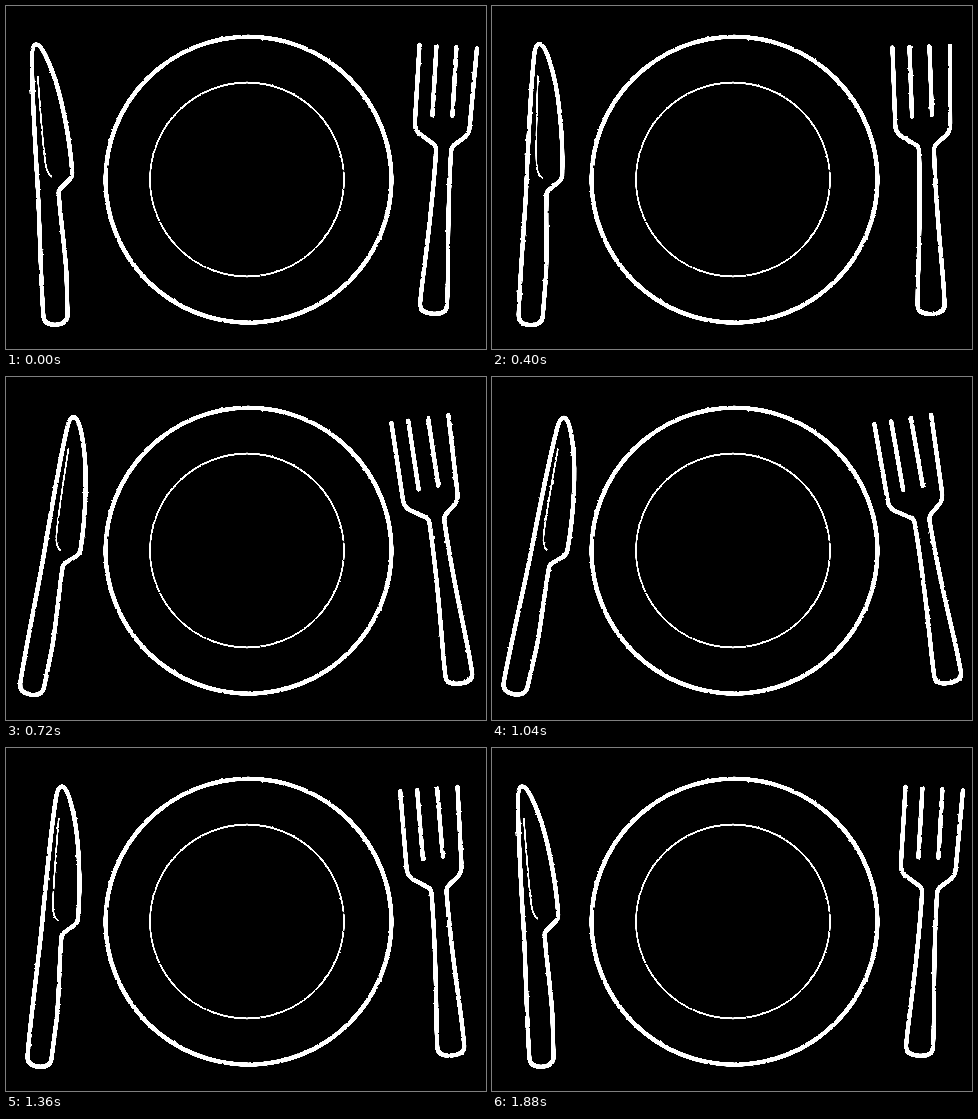
An HTML page for the animation above (1920 ms loop, 480 px wide and 343 px high).

```html
<!DOCTYPE html>
<html lang="en">
<head>
<meta charset="utf-8">
<title>Place setting</title>
<style>
  html, body { margin: 0; width: 100%; height: 100%; overflow: hidden; background: #000; }
  svg { display: block; width: 480px; height: 343px; }
  .ink { fill: none; stroke: #fff; stroke-width: 4.5; stroke-linecap: round; stroke-linejoin: round; }
  .thin { stroke-width: 1.8; }
</style>
</head>
<body>
<svg viewBox="0 0 480 343">
  <defs>
    <!-- chalky, hard-edged outline -->
    <filter id="rough" filterUnits="userSpaceOnUse" x="0" y="0" width="480" height="343" color-interpolation-filters="sRGB">
      <feTurbulence type="fractalNoise" baseFrequency="0.22" numOctaves="2" seed="4" result="noise"/>
      <feDisplacementMap in="SourceGraphic" in2="noise" scale="2" xChannelSelector="R" yChannelSelector="G"/>
      <feComponentTransfer><feFuncA type="linear" slope="6" intercept="-2.5"/></feComponentTransfer>
    </filter>
  </defs>
  <rect width="480" height="343"/>
  <g class="ink" filter="url(#rough)">
    <circle cx="242.5" cy="173.7" r="143"/>
    <circle class="thin" cx="241" cy="173.5" r="97"/>
    <g id="knife">
      <path d="M42 38C47 38 52 52 56 65C63 88 69 130 69 168Q69 172 66 175L56 183.500Q53.500 186 54 190C54 215 56.500 245 56 270L54.200 309Q54 319 42 319Q30 319 30 309C30 270 33 215 33.500 180C34 130 34.500 85 37 50Q38 38 42 38Z"/>
      <path class="thin" d="M41.500 70C41.500 100 41.500 140 43 158Q44 169 49 171.500"/>
    </g>
    <g id="fork">
      <path d="M404.500 40.500L405 118Q405 125 410 129L424 138Q428 140 428 145C428 205 425 240 422.500 285L422 299Q422 308 435.500 308Q449 308 449 299L448.500 280C447 245 443 205 443 145Q443 140 447 137L456 129.500Q460 125 460 118L462 40.500"/>
      <path d="M421.500 40.500L422 110M441.500 40.500L442 109"/>
    </g>
  </g>
</svg>
<script>
  const LOOP = 1920, STEP = 40;
  const knife = document.getElementById('knife');
  const fork = document.getElementById('fork');

  const turn = (el, deg, x, y) => el.setAttribute('transform', `rotate(${deg.toFixed(3)} ${x} ${y})`);

  // Knife and fork sway in mirror image on one sine.
  function draw(ms) {
    const t = Math.floor(ms % LOOP / STEP) * STEP;
    const sway = 3.3 - 7.4 * Math.cos(2 * Math.PI * (t + 20) / LOOP);
    turn(knife, sway, 42, 206);
    turn(fork, -0.92 * sway, 434.5, 177);
  }

  const start = performance.now();
  function tick() {
    draw(performance.now() - start);
    requestAnimationFrame(tick);
  }
  draw(0);
  requestAnimationFrame(tick);
</script>
</body>
</html>
```
